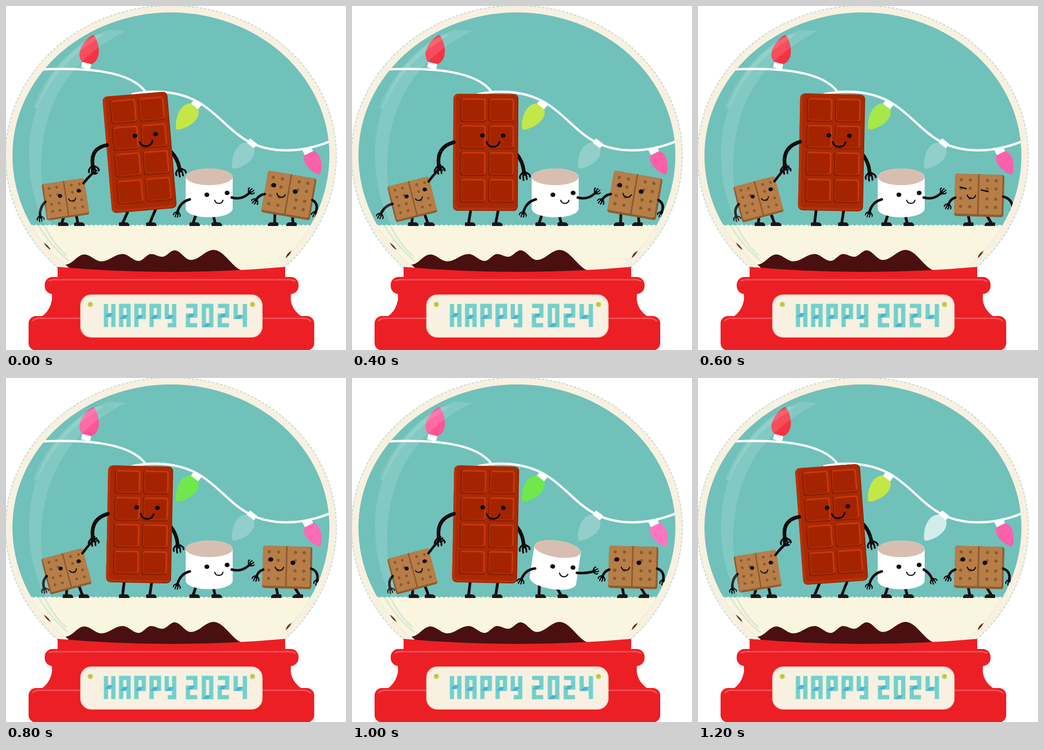
An HTML page with a canvas that plays this animation: 738 px wide and 749 px high, repeating every 1.3 s.

```html
<!DOCTYPE html>
<html lang="en">
<head>
<meta charset="utf-8">
<title>Happy 2024</title>
<style>
html, body { margin: 0; width: 100%; height: 100%; overflow: hidden; background: #fff; }
canvas { display: block; width: 738px; height: 749px; }
</style>
</head>
<body>
<canvas id="stage" width="738" height="749" role="img" aria-label="HAPPY 2024">HAPPY 2024</canvas>
<script>
const c = document.getElementById('stage').getContext('2d');
const LOOP = 1300, STEP = 100, GROUND = 478, RAD = Math.PI / 180;
const INK = '#120c0f', CREAM = '#f8f0e0', RED = '#ec1f25', TEAL = '#70c1ba';
let now = 0;

// Smooth 0..1 ramp over a time span, and a rise that falls again.
function ease(from, to) {
  const k = Math.min(1, Math.max(0, (now - from) / (to - from)));
  return k * k * (3 - 2 * k);
}
const pulse = (from, top, to) => ease(from, top) - ease(top, to);

function fill(color, draw) { c.beginPath(); draw(); c.fillStyle = color; c.fill(); }
function line(color, width, draw) {
  c.beginPath(); draw();
  c.strokeStyle = color; c.lineWidth = width; c.stroke();
}
function svg(d, color, width) {
  const p = new Path2D(d);
  if (width) { c.strokeStyle = color; c.lineWidth = width; c.stroke(p); }
  else { c.fillStyle = color; c.fill(p); }
}
function box(color, x, y, w, h, r) { fill(color, () => c.roundRect(x, y, w, h, r)); }
function disc(color, x, y, rx, ry = rx) { fill(color, () => c.ellipse(x, y, rx, ry, 0, 0, 7)); }
function group(x, y, angle, draw) {
  c.save(); c.translate(x, y); c.rotate(angle); draw(); c.restore();
}

// Globe outline: the lower half is slightly taller than the upper.
function globe(rx, up, down) {
  c.ellipse(358, 325, rx, up, 0, Math.PI, 2 * Math.PI);
  c.ellipse(358, 325, rx, down, 0, 0, Math.PI);
}

// Arm bowed sideways by `bend`, ending in a hand that follows the forearm.
function arm([x0, y0], [x, y], bend, w) {
  const dx = x - x0, dy = y - y0, len = Math.hypot(dx, dy);
  const bx = (x0 + x) / 2 - dy / len * bend, by = (y0 + y) / 2 + dx / len * bend;
  line(INK, w, () => { c.moveTo(x0, y0); c.quadraticCurveTo(bx, by, x, y); });
  group(x, y, Math.atan2(y - by, x - bx), () => {
    const s = w / 7.5;
    c.scale(s, s);
    disc(INK, 5, 0, 6, 4.5);
    for (const spread of [-1.2, -0.45, 0.3, 1]) {
      line(INK, 3.6, () => {
        c.moveTo(4, spread * 3);
        c.quadraticCurveTo(10, spread * 11, 21 - Math.abs(spread) * 6, spread * 9);
      });
    }
  });
}

function leg([x0, y0], x, side) {
  line(INK, 6, () => { c.moveTo(x0, y0); c.lineTo(x, GROUND - 5); });
  group(x, GROUND, 0, () => {
    c.scale(side, 1);
    box('#1b1518', -8, -7, 23, 8, [3, 7, 1, 1]);
  });
}

// Shoulders and hips turn with the body; feet stay planted on the ground.
function figure(f) {
  const angle = f.tilt * RAD, cos = Math.cos(angle), sin = Math.sin(angle);
  const turn = ([x, y]) => [f.x + x * cos - y * sin, f.y + x * sin + y * cos];
  f.hips.forEach((hip, i) => leg(turn(hip), f.feet[i], f.side || 1));
  if (f.swing) arm(turn(f.shoulders[1]), turn(f.swing), f.bends[1], f.limb);
  group(f.x, f.y, angle, f.body);
  arm(turn(f.shoulders[0]), f.hands[0], f.bends[0], f.limb);
  if (!f.swing) arm(turn(f.shoulders[1]), f.hands[1], f.bends[1], f.limb);
}

function face(x, y, size, ...eyes) {
  for (const [ex, ey] of eyes) disc(INK, ex, ey, 5.3, 4.8);
  line(INK, size * .28, () => {
    c.moveTo(x - size, y);
    c.bezierCurveTo(x - size * .7, y + size, x + size * .7, y + size, x + size, y);
  });
}

function barBody() {
  box('#8f1f02', -70.5, -127.5, 141, 254.5, 10);
  box('#b93107', -70.5, -127.5, 139, 253, 10);
  box('#a82903', -65, -126.5, 134, 247, 9);
  for (let i = 0; i < 8; i++) {
    const x = -56 + i % 2 * 61.5, y = -118 + (i >> 1) * 58.5;
    box('#8b1e02', x, y, 56, 52, 5);
    box('#c8390c', x + 3, y, 53, 49, 5);
    box('#a52400', x + 4, y + 3.5, 48.5, 44.5, 4);
  }
  face(16, -23, 14, [-7, -37], [38, -37]);
}

function crackerBody(size, side, blink) {
  c.scale(side * size, size);
  box('#8e5c31', -53.5, -46, 107, 92, 5);
  box('#b77e47', -49.5, -46, 103, 87, 4);
  line('#8e5c31', 3.5, () => { c.moveTo(2, -45); c.lineTo(2, 41); });
  for (const y of [-33, -15, 7, 25]) for (const x of [-36, -17, 20, 40]) disc('#8b5a31', x, y, 3.5);
  if (blink) line(INK, 3, () => { c.moveTo(42, -17); c.lineTo(29, -14); c.moveTo(-4, -12); c.lineTo(-19, -9); });
  face(17, 0, 9, ...(blink ? [] : [[-12, -10.5], [36, -16.5]]));
}

function puffBody() {
  fill('#fff', () => {
    c.moveTo(-51, -35); c.lineTo(-51, 34);
    c.bezierCurveTo(-46, 58, 46, 58, 51, 34);
    c.lineTo(51, -35);
    c.ellipse(0, -36, 51, 18, 0, 0, Math.PI, true);
  });
  disc('#d8beb0', 0, -36, 51, 18);
  face(21, 15, 9, [-5, 3], [39, -1]);
}

function cast() {
  const lean = 1 - ease(300, 430) + ease(1000, 1250);
  const flick = pulse(300, 400, 600);
  figure({
    x: 290, y: 319, tilt: 1.1 - 5.9 * lean, body: barBody, limb: 8,
    shoulders: [[-69, -22], [69, 5]], hips: [[-30, 115], [30, 115]], feet: [253, 312],
    hands: [[188, 345]], swing: [83, 39], bends: [25, -5]
  });
  figure({
    x: 131 - 2 * lean, y: 421, tilt: -15 + 6.5 * lean, body: () => crackerBody(.87, 1), limb: 5.5,
    shoulders: [[-44, -1], [44, -29]], hips: [[-8, 35], [18, 35]], feet: [131 - 10 * lean, 166 - 10 * lean],
    hands: [[82 - 8 * lean - 17 * flick, 455 - 5 * flick], [186, 357 + 9 * lean]], bends: [7, -1]
  });

  const tilt = pulse(800, 1000, 1200), drop = ease(800, 1200);
  figure({
    x: 441, y: 408, tilt: 8.5 * tilt, body: puffBody, limb: 5.5,
    shoulders: [[-42, 13], [49, 9]], hips: [[-28, 44], [8, 44]], feet: [406, 454],
    hands: [[373 - 4 * tilt, 446 - 11 * tilt], [526 - 19 * drop * drop, 409 + 26 * drop]], bends: [10, 10 - 14 * drop]
  });

  const tip = 1 - ease(400, 600), shrug = pulse(500, 600, 800);
  figure({
    x: 610.5 + 3.5 * tip, y: 412.5, tilt: 1.6 + 8.2 * tip, body: () => crackerBody(1, -1, now === 600), limb: 5.5, side: -1,
    shoulders: [[-52, 6], [52, 1]], hips: [[-24, 38], [14, 38]], feet: [590 - 7 * tip, 637 - 14 * tip],
    hands: [[545, 429 - 10 * tip], [676 - 3 * tip + 7 * shrug, 437 + 9 * tip]], bends: [4, -10]
  });
}

function bulb(x, y, tx, ty, wide, from, to, k) {
  const len = Math.hypot(tx - x, ty - y);
  const rgb = from.map((v, i) => Math.round(v + (to[i] - v) * k));
  group(x, y, Math.atan2(ty - y, tx - x), () => {
    fill(`rgb(${rgb})`, () => {
      c.moveTo(5, -9);
      c.bezierCurveTo(len * .26, -wide * .78, len * .72, -wide * .52, len - 2, -3);
      c.quadraticCurveTo(len + 1, 0, len - 2, 3);
      c.bezierCurveTo(len * .72, wide * .52, len * .26, wide * .78, 5, 9);
    });
    box('#fff', -6, -10, 12, 20, 1);
  });
}

function lights() {
  const glow = pulse(600, 800, 1000) + ease(800, 1000) - ease(1000, 1200);
  svg('M80 138C180 134 270 142 303 187', '#fff', 5);
  svg('M274 192C330 180 385 188 425 214C465 240 490 277 530 297C575 320 640 321 705 294', '#fff', 5);
  bulb(174, 130, 190, 63, 38, [244, 52, 69], [252, 84, 150], glow);
  bulb(413, 214, 370, 269, 37, [196, 231, 72], [112, 232, 76], ease(500, 750) - ease(1000, 1200));
  bulb(534, 299, 492, 354, 37, [146, 207, 202], [208, 237, 234], ease(1000, 1200));
  bulb(655, 315, 681, 367, 31, [252, 96, 173], [255, 118, 192], ease(600, 1000) - ease(1000, 1200));
}

function ground() {
  fill('#faf5de', () => {
    c.moveTo(0, 600); c.lineTo(0, GROUND + .5);
    for (let x = 0; x < 738; x += 10) c.quadraticCurveTo(x + 5, GROUND - 4, x + 10, GROUND + .5);
    c.lineTo(738, 600);
  });
}

// Cosine waves joining alternate crests and dips.
function syrup() {
  const turns = [[129, 563], [170, 541], [207, 556], [253, 540], [288, 555], [315, 540], [339, 546], [366, 532], [401, 553], [451, 531], [518, 577]];
  fill('#4a1011', () => {
    turns.slice(1).forEach(([x1, y1], i) => {
      const [x0, y0] = turns[i];
      for (let k = 0; k <= 1; k += .1) c.lineTo(x0 + (x1 - x0) * k, y0 + (y1 - y0) * (1 - Math.cos(Math.PI * k)) / 2);
    });
    c.lineTo(518, 577); c.lineTo(340, 584); c.lineTo(145, 578);
  });
  svg('M82 515Q92 521 97 531Q88 527 82 515ZM620 533Q609 538 607 549Q616 543 620 533Z', '#6b3327');
}

function glass() {
  svg('M222 52C120 90 50 200 50 325C51 415 78 480 132 545C95 475 76 425 76 350C79 240 112 130 260 54Z', 'rgba(255,255,255,.13)');
  svg('M196 62C130 97 82 158 59 223L68 223C94 160 138 106 214 62Z', 'rgba(255,255,255,.12)');
  svg('M60 455Q84 511 134 553M78 466Q98 513 130 542', 'rgba(112,193,186,.22)', 4);
}

function base() {
  svg('M112 568Q360 590 606 568L606 591L112 591Z', RED);
  svg('M99 620L100 638Q96 664 76 677L643 677Q620 662 618 638L619 620Z', RED);
  box(RED, 84, 590, 551, 37, 17);
  box(RED, 49, 675, 620, 75, 16);
  svg('M94 598Q102 595 114 596L606 596Q620 595 627 599M58 685Q64 679 77 680L161 680M557 680L645 680Q656 680 661 686', '#f4565b', 3);
  box('#f6c5b7', 161, 628, 396, 94, 24);
  box(CREAM, 162.5, 629.5, 393, 91, 23);
  for (const x of [183, 535]) { disc('#ddd3a0', x, 650, 6); disc('#b9ca35', x, 649.5, 4.5); }
}

// Block letters: strokes on a 16 by 42 grid, and the height of the shaded bar.
const glyphs = {
  H: ['M0 -4V46M16 -4V46M0 20H16', 20],
  A: ['M0 46V0H16V46M0 24H16', 24],
  P: ['M0 46V0H16V24H0', 24],
  Y: ['M0 -4V24H16M16 -4V42H2', 24],
  2: ['M-4 0H16V21H0V42H20', 21],
  0: ['M0 0H16V42H0Z', 42],
  4: ['M0 -4V24H20M20 -4V46', 24]
};
function word(text, x, gap) {
  [...text].forEach((ch, i) => group(x + i * gap, 653, 0, () => {
    const [d, bar] = glyphs[ch];
    svg(d, '#bfe6df', 10.5);
    svg(d, '#72d0ca', 8.5);
    svg(`M-3 ${bar + 4}L5 ${bar - 4}H15L9 ${bar + 4}Z`, '#4fb0d2');
  }));
}

function render() {
  c.fillStyle = '#fff';
  c.fillRect(0, 0, 738, 749);
  c.lineCap = c.lineJoin = 'round';
  fill(CREAM, () => globe(360, 327, 337));
  c.setLineDash([2, 7]);
  line('#b9ddd5', 2.5, () => globe(359, 326, 336));
  c.setLineDash([]);

  c.save();
  c.beginPath(); globe(344, 311, 322); c.clip();
  c.fillStyle = TEAL;
  c.fillRect(0, 0, 738, 749);
  lights();
  ground();
  cast();
  c.restore();

  syrup();
  glass();
  base();
  c.lineCap = 'butt';
  c.lineJoin = 'miter';
  word('HAPPY', 217, 33);
  word('2024', 395, 34.5);
}

function tick(time) {
  now = Math.floor(time % LOOP / STEP) * STEP;
  render();
  requestAnimationFrame(tick);
}
render();
requestAnimationFrame(tick);
</script>
</body>
</html>
```
